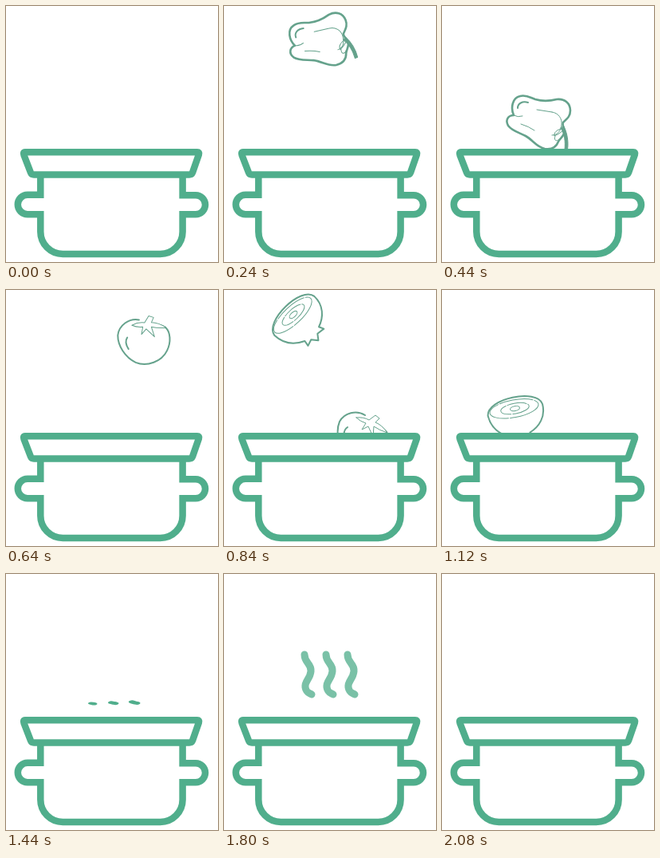
An HTML page that plays this animation: 266x321 px, repeating every 2.12 s.

```html
<!DOCTYPE html>
<html lang="en">
<head>
<meta charset="utf-8">
<title>Cooking pot</title>
<style>
  html, body { margin: 0; width: 100%; height: 100%; overflow: hidden; background: #fff; }
  svg { display: block; width: 266px; height: 321px; }
  path, ellipse { fill: none; }
  #food { stroke: #65a28c; stroke-width: 2; stroke-linejoin: round; stroke-linecap: round; }
  #food .fine { stroke-width: 1; }
  #food .body { fill: #fff; }
  #food .stem { fill: #65a28c; stroke-width: 1; }
  #pot { stroke: #50ae8c; stroke-width: 8.5; }
  #steam { stroke: #50ae8c; stroke-width: 9; stroke-linecap: round; }
</style>
</head>
<body>
<svg viewBox="0 0 266 321">
  <defs>
    <clipPath id="rim"><rect width="266" height="181"/></clipPath>
    <path id="wisp" pathLength="1" d="M110 151C107 149 103 149 102 142C101 134 108 132 109 122C110 112 101 112 101 101"/>
  </defs>
  <g id="food" clip-path="url(#rim)">
    <g id="pepper">
      <path class="body" stroke-width="2.6" d="M90 137C86 128 88 115 98 113C106 111 111 115 117 117C127 120 136 119 144 117C154 116 161 122 161 131C161 139 156 142 152 146C150 150 155 154 153 160C151 165 148 166 146 170C143 178 136 180 129 179C119 177 114 168 105 163C98 159 88 157 83 150C79 143 83 137 90 137Z"/>
      <path d="M95 128C95 122 101 119 108 121"/>
      <path class="fine" d="M119 130L138 133M99 148Q109 151 116 156M138 133C146 134 151 141 150 149C149 157 145 162 138 162M90 137Q95 140 101 138"/>
      <path class="fine" d="M150 154C144 155 140 159 141 163Q146 161 151 157M142 163C140 168 143 171 147 167"/>
      <path class="stem" d="M149 153C154 161 155 170 154 180H157.500C159 170 157 159 153 151Z"/>
    </g>
    <g id="tomato">
      <path class="body" d="M177 157C166 150 151 154 145 165C140 177 143 194 153 205C164 216 184 216 195 206C204 198 208 186 204 178Q198 171 190 168"/>
      <path class="body fine" d="M166 160Q175 159 182 163L190 157L195 161L190 166Q198 169 205 179Q195 176 188 171L187 184L181 171L173 175L178 167Q171 165 166 160Z"/>
      <path d="M151 186Q149 176 155 172"/>
    </g>
    <g id="onion">
      <path class="body" d="M-35 3C-33 -19 32 -20 35 1C36 17 26 28 13 33L16 39L6 38L1 45L-5 38L-13 41L-12 34C-26 28 -34 17 -35 3Z"/>
      <g class="fine">
        <ellipse cx="-1" rx="31" ry="11" stroke-dasharray="42 2"/>
        <ellipse rx="18" ry="6.5" stroke-dasharray="24 2"/>
        <ellipse rx="6" ry="3"/>
      </g>
    </g>
  </g>
  <g id="steam">
    <use href="#wisp"/><use href="#wisp"/><use href="#wisp"/>
  </g>
  <g id="pot">
    <path d="M43.3 213V236.8H27A12.2 12.2 0 0 0 27 261.2H43.3V283A28 28 0 0 0 71.3 311H193.6A28 28 0 0 0 221.6 283V261.2H238A12 12 0 0 0 238 237.2H221.6V213"/>
    <path stroke-linejoin="round" d="M24 183.300H240Q243 183.300 242 186L234 209Q233 211.500 230 211.500H35Q32 211.500 31 209L22.500 187Q21 183.300 24 183.300Z"/>
  </g>
</svg>
<script>
const LOOP = 2120, STEP = 40;
const $ = id => document.getElementById(id);
const clamp = v => Math.min(1, Math.max(0, v));
const smooth = v => v * v * (3 - 2 * v);

// Position and angle at a reference time, with constant rates per ms.
const foods = [
  { el: $('pepper'), pivot: [122, 146], at: 440, x: 122, y: 146, vx: 0, vy: .5, angle: 0, spin: .11, until: 620 },
  { el: $('tomato'), pivot: [173, 183], at: 840, x: 173, y: 183, vx: 0, vy: .6, angle: 0, spin: .11, until: 920 },
  { el: $('onion'), pivot: [0, 0], at: 840, x: 87, y: 31, vx: .016, vy: .42, angle: -43, spin: .115, until: 1260 }
];
const wisps = [...$('steam').children];
const wispStart = [1402, 1388, 1380];
const steamBase = 170;

function draw(t) {
  for (const f of foods) {
    const d = t - f.at;
    const [px, py] = f.pivot;
    f.el.style.display = t > 0 && t < f.until ? '' : 'none';
    f.el.setAttribute('transform',
      `translate(${f.x + f.vx * d} ${f.y + f.vy * d}) rotate(${f.angle + f.spin * d}) translate(${-px} ${-py})`);
  }
  // Each wisp is drawn from its lower end while it stretches upward.
  wisps.forEach((w, i) => {
    const p = smooth(clamp((t - wispStart[i]) / 280));
    w.style.display = p > 0 ? '' : 'none';
    w.setAttribute('stroke-dasharray', `${p} 2`);
    w.setAttribute('transform',
      `translate(${27 * i} ${steamBase}) scale(1 ${.35 + .65 * p}) translate(0 ${-steamBase})`);
  });
  $('steam').setAttribute('opacity', 1 - clamp((t - 1720) / 330));
}

const start = performance.now();
function tick() {
  const t = (performance.now() - start) % LOOP;
  draw(Math.floor(t / STEP) * STEP);
  requestAnimationFrame(tick);
}
tick();
</script>
</body>
</html>
```
